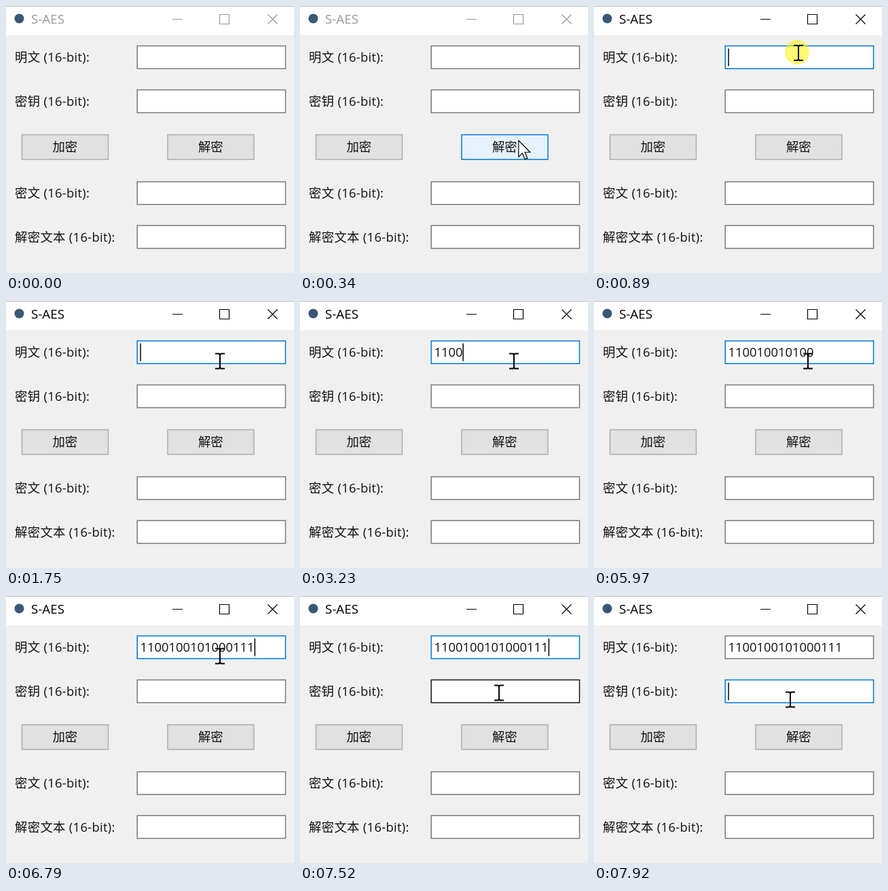
These frames come from a looping animation (424x393 px, 8 s). An HTML page:

```html
<!DOCTYPE html>
<html lang="zh-CN">
<head>
<meta charset="utf-8">
<style>
html, body { margin: 0; width: 100%; height: 100%; overflow: hidden; background: #f0f0f0; }
svg { display: block; }
text { font: 18.4px "Open Sans", "Noto Sans CJK SC", "Noto Sans CJK", sans-serif; fill: #111; }
.label { letter-spacing: .3px; }
.field { fill: #fff; stroke: #7a7a7a; stroke-width: 1.5; }
.button { fill: #e1e1e1; stroke: #adadad; stroke-width: 1.5; }
.field.hover { stroke: #171717; }
.field.focus { stroke: #0078d7; }
.button.hover { fill: #e5f1fb; stroke: #0078d7; }
#bar { --ink: #999; }
#bar.active { --ink: #000; }
#bar text { fill: var(--ink); font-size: 18.8px; }
#bar path { fill: none; stroke: var(--ink); stroke-width: 1.2; }
</style>
</head>
<body>
<svg id="stage" width="424" height="393" viewBox="0 0 424 393">
  <g id="bar">
    <rect width="424" height="43" fill="#fff"/>
    <rect width="424" height="1" fill="#bdbdbd"/>
    <circle cx="19.5" cy="18.5" r="7" fill="#3a5875"/>
    <text x="37" y="26">S-AES</text>
    <path d="M245 19.5h15M314.5 12.5h14v14h-14zM385.5 12.5l14 14m0-14l-14 14"/>
  </g>
  <g id="form"></g>
  <text id="typed" x="197.4" y="82"></text>
  <rect id="caret" width="1.5" height="26"/>
  <circle id="glow" r="18" fill="#fff200" fill-opacity=".55"/>
  <path id="beam" d="M-7-12h6l1 1l1-1h6v2h-5l-1 1v18l1 1h5v2h-6l-1-1l-1 1h-6v-2h5l1-1v-18l-1-1h-5z"/>
  <path id="arrow" d="M0 0V24L5.5 18.7L9.3 27.5L13 26L9.2 17.2H17z" fill="#fff" stroke="#000" stroke-width="1.2"/>
</svg>
<script>
const $ = id => document.getElementById(id);
const LOOP = 8000, BITS = '1100100101000111';
const KEYS = [2350, 2550, 3010, 3230, 3970, 4170, 4370, 4570, 5030, 5170, 5570, 5770, 6040, 6240, 6380, 6790];
// The caret switches on and off in turn
const BLINKS = [820, 1420, 1750, 2350, 2680, 3300, 3570, 4240, 4500, 5100, 5370, 5970, 6310, 6920, 7180];
const CLICK1 = 820, CLICK2 = 7780, CLICK_TIME = 130;

function add(tag, attrs, content = '') {
  const el = document.createElementNS('http://www.w3.org/2000/svg', tag);
  for (const key in attrs) el.setAttribute(key, attrs[key]);
  el.textContent = content;
  return $('form').appendChild(el);
}

function box(kind, x, y, width, height) {
  const el = add('rect', { class: kind, x, y, width, height });
  return { el, kind, has: p => p.x >= x && p.x <= x + width && p.y >= y && p.y <= y + height };
}

const fields = [['明文', 58.7], ['密钥', 123.5], ['密文', 258.7], ['解密文本', 323.2]].map(([name, y]) => {
  add('text', { class: 'label', x: 13, y: y + 23.3 }, name + ' (16-bit):');
  return box('field', 193.2, y, 218.3, 33.5);
});

const buttons = [['加密', 23.5], ['解密', 238]].map(([name, x]) => {
  const button = box('button', x, 189.5, 127, 36.3);
  add('text', { x: x + 63.3, y: 214, 'text-anchor': 'middle' }, name);
  return button;
});
const boxes = [...fields, ...buttons];

const passed = (times, t) => times.filter(at => t >= at).length;
const mix = (a, b, k) => ({ x: a.x + (b.x - a.x) * k, y: a.y + (b.y - a.y) * k });

const entry = { x: 352, y: 385 }, first = { x: 301, y: 69 };
const rest = { x: 315, y: 88.5 }, second = { x: 289, y: 152.5 };

// The pointer advances in discrete steps, as a screen recorder sees it
function pointer(t) {
  if (t < 1150) {
    const p = Math.min(1, Math.floor((t - 70) / 68.5) / 7);
    return mix(entry, first, 1 - (1 - p) ** 1.6);
  }
  if (t < 1220) return { x: 301, y: 76 };
  if (t < 1420) return { x: 301, y: 84.5 };
  if (t < 1490) return { x: 308, y: 87 };
  const p = passed([7380, 7450, 7520, 7590], t) / 4;
  return mix(rest, second, p * p * (3 - 2 * p));
}

const show = (id, on) => $(id).style.display = on ? '' : 'none';
const place = (id, x, y) => $(id).setAttribute('transform', `translate(${x} ${y})`);

function draw(t) {
  const present = t >= 70;
  const at = pointer(Math.max(t, 70));
  const focus = t >= CLICK2 ? fields[1] : t >= CLICK1 ? fields[0] : null;
  const count = passed(KEYS, t);

  $('bar').classList.toggle('active', t >= CLICK1);
  for (const b of boxes) {
    b.el.classList.toggle('hover', present && b.has(at));
    b.el.classList.toggle('focus', b === focus);
  }

  $('typed').textContent = BITS.slice(0, count);
  show('caret', passed(BLINKS, t) % 2);
  if (focus === fields[1]) place('caret', 197.3, 127.5);
  else place('caret', 197.3 + 10.52 * count, 62.5);

  const overField = fields.some(f => f.has(at));
  show('beam', present && overField);
  show('arrow', present && !overField);
  show('glow', [CLICK1, CLICK2].some(c => t >= c && t < c + CLICK_TIME));
  place('beam', at.x, at.y);
  place('arrow', at.x, at.y);
  place('glow', at.x - 2, at.y - 1);
}

const start = performance.now();
function tick() {
  draw((performance.now() - start) % LOOP);
  requestAnimationFrame(tick);
}
tick();
</script>
</body>
</html>
```
